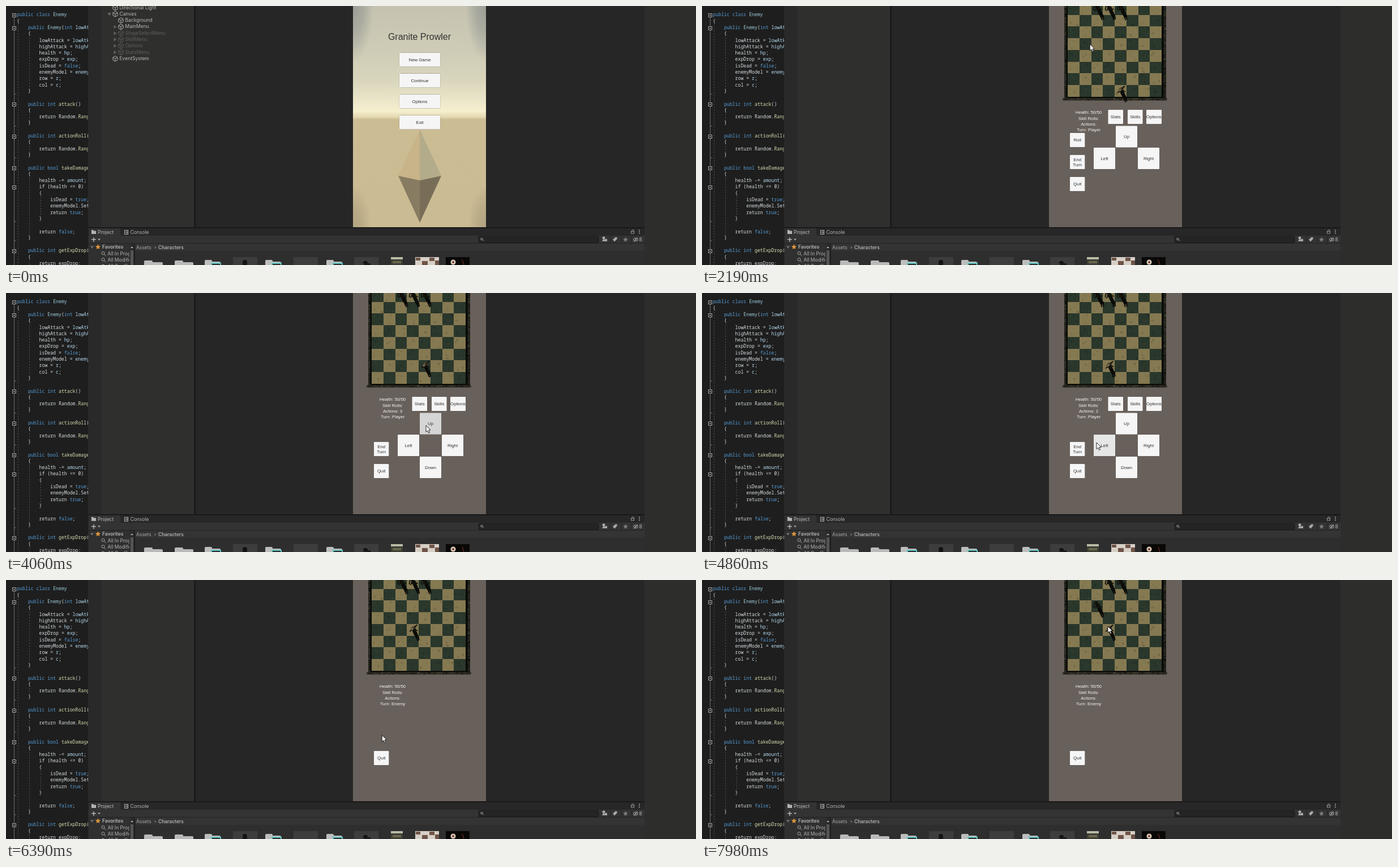
An HTML page with a canvas that plays this animation: 1219x459 px, repeating every 8 s.

```html
<!DOCTYPE html>
<html lang="en">
<head>
<meta charset="utf-8">
<title>Game editor</title>
<style>
html, body { margin: 0; width: 100%; height: 100%; overflow: hidden; background: #262626; }
canvas { display: block; }
</style>
</head>
<body>
<canvas id="stage" width="1219" height="459"></canvas>
<script>
const W = 1219, H = 459, LOOP = 8000;
const UI = 'Inter, sans-serif', ARIAL = '"Liberation Sans", Arial, sans-serif', MONO = '"Noto Sans Mono", monospace';
const screen = document.getElementById('stage').getContext('2d');
let c = screen;

// ---------- helpers ----------
function rect(x, y, w, h, fill) { c.fillStyle = fill; c.fillRect(x, y, w, h); }
function poly(fill, ...p) {
  c.beginPath();
  for (let i = 0; i < p.length; i += 2) c.lineTo(p[i], p[i + 1]);
  c.closePath(); c.fillStyle = fill; c.fill();
}
function line(color, width, ...p) {
  c.beginPath();
  for (let i = 0; i < p.length; i += 2) c.lineTo(p[i], p[i + 1]);
  c.strokeStyle = color; c.lineWidth = width; c.stroke();
}
function oval(x, y, rx, ry, fill, turn = 0) {
  c.beginPath(); c.ellipse(x, y, rx, ry, turn, 0, 7); c.fillStyle = fill; c.fill();
}
function ring(x, y, r, color) {
  c.beginPath(); c.arc(x, y, r, 0, 7); c.strokeStyle = color; c.lineWidth = 1; c.stroke();
}
function text(s, x, y, font, color, align = 'left') {
  c.font = font; c.fillStyle = color; c.textAlign = align; c.textBaseline = 'middle';
  c.fillText(s, x, y);
}
function glow(x, y, rx, ry, rgb, alpha) {
  c.save(); c.translate(x, y); c.scale(rx, ry);
  const g = c.createRadialGradient(0, 0, 0, 0, 0, 1);
  g.addColorStop(0, `rgba(${rgb},${alpha})`);
  g.addColorStop(.5, `rgba(${rgb},${alpha * .65})`);
  g.addColorStop(1, `rgba(${rgb},0)`);
  c.fillStyle = g; c.fillRect(-1, -1, 2, 2); c.restore();
}
function random(seed) {
  return () => (seed = seed * 16807 % 2147483647) / 2147483647;
}
function layer(draw) {
  const canvas = document.createElement('canvas');
  canvas.width = W; canvas.height = H;
  c = canvas.getContext('2d'); draw(); c = screen;
  return canvas;
}

// ---------- code editor ----------
const CODE = `public class Enemy
{
    public Enemy(int lowAtk, int
    {
        lowAttack = lowAtk;
        highAttack = highAtk;
        health = hp;
        expDrop = exp;
        isDead = false;
        enemyModel = enemy;
        row = r;
        col = c;
    }

    public int attack()
    {
        return Random.Range(low
    }

    public int actionRoll()
    {
        return Random.Range(1
    }

    public bool takeDamage(int
    {
        health -= amount;
        if (health <= 0)
        {
            isDead = true;
            enemyModel.SetActive
            return true;
        }

        return false;
    }

    public int getExpDrop()
    {
        return expDrop;`.split('\n');
const lineY = i => 16 + i * 11.3;

function tokenColor(word, rest) {
  if (/^(public|class|int|bool|true|false)$/.test(word)) return '#569cd6';
  if (word === 'Enemy') return '#9ccfdc';
  if (/^(lowAtk|highAtk|hp|exp|enemy|r|c|amount)$/.test(word)) return '#b4d8ee';
  if (rest.startsWith('(') && word !== 'if') return '#dcdcb4';
  return '#d4dade';
}
function drawCode() {
  rect(0, 0, 145, H, '#1e1e1e');
  c.save();
  c.beginPath(); c.rect(0, 0, 145, H); c.clip();
  line('#6f6f6f', 1, 14.5, 20, 14.5, H);
  for (const i of [12, 17, 22, 32, 35]) line('#6f6f6f', 1, 14.5, lineY(i) + 4.5, 18, lineY(i) + 4.5);
  for (const i of [0, 2, 14, 19, 24, 27, 37]) {
    const y = Math.round(lineY(i)) + .5;
    rect(11, y - 3.5, 7, 7, '#1e1e1e');
    c.strokeStyle = '#a5a5a5'; c.lineWidth = 1; c.strokeRect(11.5, y - 3, 6, 6);
    line('#d0d0d0', 1, 13, y, 16, y);
  }
  c.setLineDash([2, 3]);
  const guide = (x, a, b) => line('#5a5a5a', 1, x, lineY(a) + 6, x, lineY(b) - 5);
  guide(21.5, 1, 42);
  for (const [a, b] of [[3, 12], [15, 17], [20, 22], [25, 35], [38, 42]]) guide(41.5, a, b);
  guide(61.5, 28, 32);
  c.setLineDash([]);
  CODE.forEach((s, i) => {
    for (const m of s.matchAll(/\w+|[^\w\s]/g))
      text(m[0], 19.2 + m.index * 4.92, lineY(i), '8.2px ' + MONO, tokenColor(m[0], s.slice(m.index + m[0].length)));
  });
  c.restore();
}

// ---------- editor window ----------
function folder(x) {
  c.beginPath(); c.roundRect(x, 451, 15, 12, 2); c.roundRect(x, 454, 33, 12, 2);
  c.fillStyle = '#b9b9b9'; c.fill();
}
function prefab(x) {
  c.beginPath(); c.roundRect(x, 450, 13, 12, 2); c.roundRect(x, 453, 28, 10, 2);
  c.fillStyle = '#bdbdbd'; c.fill();
  rect(x + 11, 455, 18, 4, '#5fc6c2'); rect(x + 13, 457, 14, 2, '#2e2e2e');
}
function magnifier(x, y, r) {
  ring(x, y, r, '#a8a8a8'); line('#a8a8a8', 1, x + r * .7, y + r * .7, x + r * 2, y + r * 2);
}
function star(x, y, r, fill) {
  const p = [];
  for (let i = 0; i < 10; i++) {
    const a = i * Math.PI / 5, d = i % 2 ? r * .45 : r;
    p.push(x + Math.sin(a) * d, y - Math.cos(a) * d);
  }
  poly(fill, ...p);
}
function drawEditor() {
  rect(0, 0, W, H, '#262626');
  drawCode();
  rect(145, 0, 23, H, '#292929');
  rect(168, 0, 164, 392, '#2f2f2d');
  rect(332, 0, 2, 392, '#191919');
  rect(334, 0, 2, 392, '#212121');
  rect(1128, 0, 91, H, '#2d2d2c');

  rect(146, 392, 982, 67, '#303030');
  rect(146, 392, 982, 2, '#191919');
  rect(146, 394, 982, 13, '#272727');
  rect(147, 394, 55, 13, '#333333');
  rect(146, 407, 982, 14, '#333333');
  rect(146, 420, 982, 1, '#222222');
  rect(228, 421, 900, 13, '#343434');
  rect(228, 434, 900, 25, '#2e2e2e');
  rect(226, 421, 2, 38, '#202020');
  rect(219, 421, 7, 38, '#2a2a2a');
  rect(220, 433, 5, 26, '#555555');
  poly('#aaa', 220, 429, 225, 429, 222.5, 426);
  poly('#b4b4b4', 151, 397, 154, 397, 155, 398.5, 159, 398.5, 159, 404, 151, 404);
  text('Project', 162, 401, '8.5px ' + UI, '#bcbcbc');
  c.strokeStyle = '#b0b0b0'; c.lineWidth = 1; c.strokeRect(209.5, 397.5, 6, 7);
  line('#b0b0b0', 1, 211, 400, 215, 400); line('#b0b0b0', 1, 211, 402, 215, 402);
  text('Console', 219.5, 401, '8.5px ' + UI, '#b4b4b4');
  rect(151, 413, 8, 1.4, '#bbb'); rect(154.3, 410, 1.4, 8, '#bbb');
  poly('#aaa', 162, 412.5, 167, 412.5, 164.5, 415.5);

  c.beginPath(); c.roundRect(835, 408, 212, 11.5, 2);
  c.fillStyle = '#242424'; c.fill(); c.strokeStyle = '#1a1a1a'; c.stroke();
  magnifier(840.5, 413, 1.7);
  c.strokeStyle = '#999'; c.lineWidth = 1; c.strokeRect(1104.5, 399.5, 5, 3.5);
  c.beginPath(); c.arc(1107.5, 398.8, 2, Math.PI, 0); c.stroke();
  for (const y of [396.5, 399.2, 402]) rect(1118, y, 1.6, 1.6, '#aaa');
  for (const x of [1067.5, 1086.5, 1104.5]) rect(x, 408, 1, 12, '#242424');
  oval(1056, 411, 2.5, 2.5, '#aaa'); poly('#aaa', 1053, 417, 1056, 412, 1059, 417); rect(1058, 413, 4, 4, '#aaa');
  poly('#aaa', 1072, 414, 1077, 409.5, 1079.5, 410, 1079.5, 413, 1075, 417.5);
  star(1094.5, 414, 4.5, '#7d7d7d');
  c.beginPath(); c.ellipse(1112.5, 414, 4, 2.7, 0, 0, 7); c.strokeStyle = '#aaa'; c.stroke();
  oval(1112.5, 414, 1.3, 1.3, '#aaa'); line('#aaa', 1, 1109, 418, 1116, 410);
  text('8', 1118.5, 414.5, '8.5px ' + UI, '#b4b4b4');

  poly('#777', 149, 425.5, 155, 425.5, 152, 429.5);
  star(162.5, 427, 5, '#e0963c');
  text('Favorites', 170, 427.5, '600 8.4px ' + UI, '#b8b8b8');
  c.save(); c.beginPath(); c.rect(146, 421, 72, 38); c.clip();
  ['All In Progress', 'All Modified', 'All Conflicts'].forEach((s, i) => {
    const y = 439 + i * 11.3;
    magnifier(171.5, y - 1, 2.6);
    text(s, 179.5, y, '8.5px ' + UI, '#b2b2b2');
  });
  c.restore();
  text('Assets', 230, 428.5, '8.4px ' + UI, '#a6a6a6');
  text('>', 261, 428.5, '8px ' + UI, '#909090');
  text('Characters', 269, 428.5, '600 8.4px ' + UI, '#b0b0b0');

  [244, 298].forEach(folder);
  [351, 458, 566].forEach(prefab);
  for (const x of [401, 508, 615]) rect(x, 445, 43, 14, '#3d3d3d');
  oval(422, 454, 4, 4, '#131313'); rect(418, 456, 8, 3, '#131313');
  oval(635, 455, 4, 3, '#131313'); rect(632, 456, 12, 3, '#1a1a1a');
  rect(680, 445, 21, 14, '#3d4034'); rect(680, 445, 21, 4, '#b9bba6'); rect(683, 452, 15, 4, '#6a6750');
  rect(723, 445, 42, 14, '#d6cfc6');
  for (const [x, y, w, h] of [[724, 446, 8, 5], [735, 452, 10, 7], [748, 446, 9, 6], [758, 451, 7, 8]]) rect(x, y, w, h, '#6f5347');
  rect(777, 445, 42, 14, '#090807');
  oval(790, 454, 4.5, 4.5, '#d8cdbc'); oval(790, 454, 2, 2, '#7b3d30');
  line('#5a251e', 1.5, 806, 450, 809, 459);
}

function cube(x, y, color) {
  c.beginPath();
  for (let i = 0; i < 6; i++) c.lineTo(x + Math.sin(i * Math.PI / 3) * 4.8, y - Math.cos(i * Math.PI / 3) * 4.8);
  c.closePath(); c.strokeStyle = color; c.lineWidth = .9; c.stroke();
  line(color, .9, x - 4, y - 2.4, x, y, x + 4, y - 2.4); line(color, .9, x, y, x, y + 4.5);
}
function drawHierarchy(active) {
  const names = ['Directional Light', 'Canvas', 'Background', 'MainMenu', 'StageSelectMenu', 'SkillMenu', 'Options', 'StatsMenu', 'EventSystem'];
  names.forEach((s, i) => {
    const y = 3 + i * 11.3, child = i > 1 && i < 8;
    const color = i > 2 && i < 8 && s !== active ? '#5f5f5d' : '#b8b8b6';
    cube(child ? 203 : 193, y, color);
    if (i === 1) poly('#6c6c6a', 179.5, y - 2, 186, y - 2, 182.7, y + 3);
    if (child && i > 2) poly('#626260', 190.5, y - 3, 195.5, y, 190.5, y + 3);
    text(s, child ? 210.5 : 200.5, y, '8.5px ' + UI, color);
  });
}

// ---------- game scenes ----------
function clipGame() { c.beginPath(); c.rect(613, 0, 235, 392); c.clip(); }
function drawDesert() {
  clipGame();
  const g = c.createLinearGradient(0, 0, 0, 392);
  [[0, '#c5c3b0'], [.2, '#cecbb6'], [.34, '#dad6bd'], [.42, '#eae5c9'], [.475, '#f6f0cf'], [.503, '#e2d7af'], [.513, '#cbbc94'], [1, '#cbbb93']]
    .forEach(s => g.addColorStop(...s));
  rect(613, 0, 235, 392, g);
  for (const x of [613, 848]) {
    glow(x, 0, 36, 100, '118,126,128', .55);
    glow(x, 392, 32, 75, '138,127,102', .4);
  }
  poly('#c8b488', 731, 219, 693, 301, 731, 309);
  poly('#b2ac8a', 731, 219, 769, 301, 731, 309);
  poly('#877b62', 693, 301, 731, 309, 731, 384);
  poly('#786e58', 769, 301, 731, 309, 731, 384);
}

const CELL = 20.75, colX = i => 646 + CELL * (i + .5), rowY = i => 150.5 - CELL * (7 - i);
function drawBoard() {
  clipGame();
  rect(613, 0, 235, 392, '#68605b');
  const rnd = random(77);
  rect(640, 0, 180, 167, '#22231c');
  rect(637.5, 163, 184, 4.5, '#2a2a20');
  for (let i = 0; i < 240; i++) {
    const side = i % 3, along = rnd(), depth = rnd() * 3;
    const x = side === 0 ? 641 + depth : side === 1 ? 816 + depth : 640 + along * 178;
    const y = side === 2 ? 163.5 + depth : along * 165;
    oval(x, y, .8 + rnd() * 1.2, .7 + rnd() * .7, rnd() < .5 ? 'rgba(88,85,68,.4)' : 'rgba(10,10,8,.5)');
  }
  rect(643.5, 0, 172, 163, '#090a07');
  for (let r = 0; r < 8; r++) for (let k = 0; k < 8; k++) {
    const light = (r + k) % 2 === 1;
    const x = Math.round(colX(k) - CELL / 2), y = Math.round(rowY(r) - CELL / 2);
    rect(x, y, 21, 21, light ? '#857952' : '#2a372b');
    for (let i = 0; i < 5; i++)
      oval(x + 3 + rnd() * 15, y + 3 + rnd() * 15, 1 + rnd() * 2, .6 + rnd() * 1.2,
        light ? (i % 2 ? 'rgba(62,54,32,.25)' : 'rgba(160,148,106,.15)') : (i % 2 ? 'rgba(15,24,18,.25)' : 'rgba(66,80,58,.2)'), rnd() * 3);
  }
}
// A dark fighter seen from above, with its long shadow
function figure(x, y, sway, player) {
  c.save(); c.translate(x, y); c.scale(1.1, 1.1);
  oval(3, 5, 3, 10, '#0b0c09', -.45);
  line('#0b0c09', 2, 3, 6, 8 + sway, 10, 9, 17);
  line('#0b0c09', 1.8, 2, 6, 5, 13, 7 - sway, 18);
  line('#15140e', 1.6, -6, 3 + sway, 0, -1, 7, 1 - sway);
  oval(0, -1, 4, 3.5, '#12120d');
  if (player) { oval(1, -4, 4.2, 2.4, '#574c36', -.4); oval(-2, -1, 1.6, 1.4, '#8c7a58'); line('#0b0c09', 1.5, 1, -3, 6, -8); }
  else { oval(-2, -5, 2.4, 3, '#11110c'); line('#11110c', 1.6, -5, -8, -7, 2); }
  c.restore();
}

// ---------- timeline ----------
const PATH = [[130, 938, 402], [530, 522, 330], [900, 705, 104], [1530, 703, 100], [1850, 686, 64], [2060, 686, 64],
  [2400, 684, 75], [2900, 668, 236], [3200, 666, 242], [3400, 666, 242], [3700, 742, 232], [3950, 742, 232],
  [4130, 742, 236], [4450, 702, 270], [4650, 700, 268], [4860, 697, 265], [5150, 738, 236], [5620, 738, 236],
  [5790, 703, 257], [6100, 664, 275], [6350, 664, 275], [6720, 672, 272], [7050, 714.5, 210], [7520, 722, 150], [7980, 717, 82]];
const CLICKS = [['New Game', 1080, 1200], ['Easy Pyramid', 1900, 2020], ['Roll', 3260, 3390], ['Up', 3790, 3880],
  ['Left', 4490, 4580], ['Up', 5240, 5320], ['Up', 5530, 5620], ['End Turn', 6200, 6290]];
const after = (...times) => t => times.filter(x => t >= x).length;
const stepsUp = after(3880, 5320, 5620), stepsLeft = after(4580), enemySteps = after(7400, 7750);

function pointer(t) {
  const i = PATH.findIndex(p => p[0] > t);
  if (i < 0) return PATH[PATH.length - 1].slice(1);
  const [a, ax, ay] = PATH[i - 1], [b, bx, by] = PATH[i];
  const k = (t - a) / (b - a), e = k * k * (3 - 2 * k);
  return [ax + (bx - ax) * e, ay + (by - ay) * e];
}
function drawPointer(x, y) {
  c.save(); c.translate(x, y);
  c.beginPath();
  for (const p of [[0, 0], [0, 11.5], [2.6, 9.2], [4.6, 13.5], [6.5, 12.6], [4.6, 8.5], [8, 8.2]]) c.lineTo(...p);
  c.closePath();
  c.fillStyle = '#fff'; c.fill(); c.strokeStyle = '#111'; c.lineWidth = .9; c.stroke();
  c.restore();
}
function button(t, at, label, x, y, w, h, edge) {
  const over = at && at[0] >= x && at[0] < x + w && at[1] >= y && at[1] < y + h;
  let shade = over ? 230 : 245;
  for (const [name, down, up] of CLICKS)
    if (name === label && t >= down) shade = Math.min(shade, 165 + 80 * Math.max(0, t - up) / 300);
  if (edge) { c.beginPath(); c.roundRect(x - .3, y - .4, w + .6, h + .9, 2); c.fillStyle = 'rgba(95,90,75,.6)'; c.fill(); }
  c.beginPath(); c.roundRect(x, y, w, h, 1); c.fillStyle = `rgb(${shade},${shade},${shade})`; c.fill();
  const lines = label === 'End Turn' ? ['End', 'Turn'] : [label];
  lines.forEach((s, i) => text(s, x + w / 2, y + h / 2 + .5 + (i - (lines.length - 1) / 2) * 9, '7.8px ' + ARIAL, '#323232', 'center'));
}

function drawMenus(t, at) {
  c.drawImage(desert, 0, 0);
  const main = t < 1200;
  drawHierarchy(main ? 'MainMenu' : 'StageSelectMenu');
  const put = (label, x, y, w, h) => button(t, at, label, x, y, w, h, true);
  if (main) {
    text('Granite Prowler', 730.5, 56, '16px ' + ARIAL, '#323230', 'center');
    ['New Game', 'Continue', 'Options', 'Exit'].forEach((s, i) => put(s, 695, 83 + i * 37, 72, 24.5));
  } else {
    put('Easy Pyramid', 652, 43.5, 65, 45);
    put('Hard Pyramid', 744.5, 43.5, 65, 45);
    [['Skills', 104], ['Character', 135], ['Options', 166], ['Back', 199]].forEach(([s, y]) => put(s, 693, y, 73, 24.5));
  }
}

function drawGame(t, at) {
  c.drawImage(board, 0, 0);
  const sway = Math.sin(t / 350) * .5, enemyTurn = t >= 6290, rolled = t >= 3390;
  const up = stepsUp(t), left = stepsLeft(t);
  c.save(); clipGame();
  for (let i = 2; i < 5; i++) figure(colX(i) + 1.5, rowY(i === 2 ? enemySteps(t) : 0), sway, false);
  figure(colX(4 - left) + 1, rowY(7 - up), sway, true);
  c.restore();

  const actions = rolled && !enemyTurn ? 4 - up - left : '';
  ['Health: 50/50', 'Skill Rolls:', 'Actions: ' + actions, 'Turn: ' + (enemyTurn ? 'Enemy' : 'Player')]
    .forEach((s, i) => text(s.trim(), 683, 189 + i * 10.4, '7.8px ' + ARIAL, '#f4f4f4', 'center'));

  const put = (...a) => button(t, at, ...a);
  put('Quit', 650, 303, 26.3, 25);
  if (enemyTurn) return;
  put('Stats', 717.5, 184, 26.5, 25);
  put('Skills', 752, 184, 26.5, 25);
  put('Options', 785, 184, 27, 25);
  if (!rolled) put('Roll', 650, 225, 26.3, 25);
  put('End Turn', 650, 264, 26.3, 25);
  put('Up', 731, 212.5, 38, 38);
  put('Left', 692, 251, 38, 38);
  put('Right', 770, 251, 38, 38);
  if (up) put('Down', 731, 290, 38, 38);
}

const editor = layer(drawEditor), desert = layer(drawDesert), board = layer(drawBoard);

function frame(now) {
  const t = now % LOOP;
  const at = t >= 130 ? pointer(t) : null;
  c.drawImage(editor, 0, 0);
  (t < 2060 ? drawMenus : drawGame)(t, at);
  if (at) {
    if (CLICKS.some(([, down, up]) => t >= down && t < up)) oval(at[0] - 1, at[1], 8.3, 8.3, 'rgba(214,208,40,.85)');
    drawPointer(...at);
  }
  requestAnimationFrame(frame);
}
requestAnimationFrame(frame);
</script>
</body>
</html>
```
